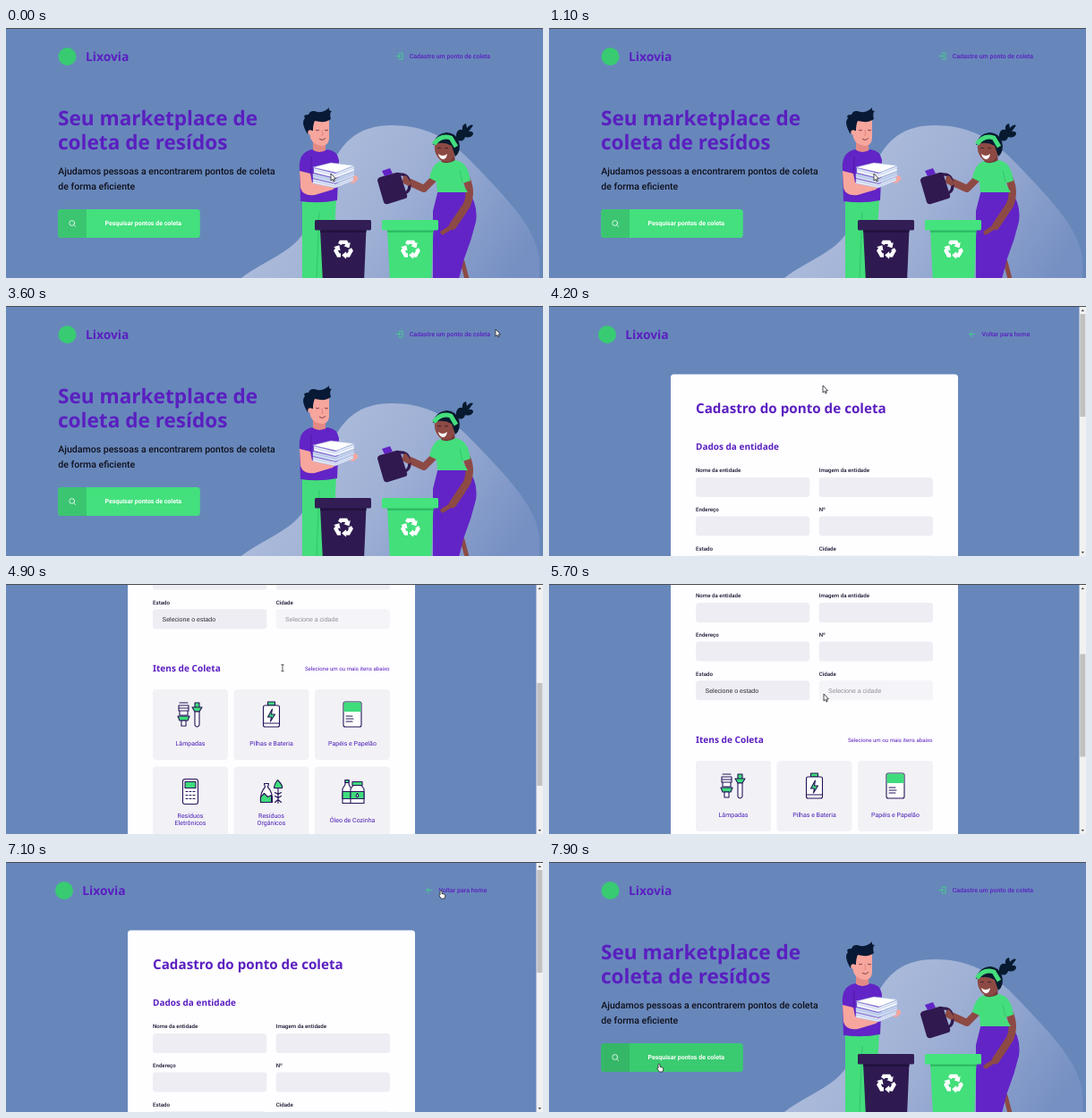
Animation of 600 by 280 pixels, one loop 8 s. Source, as an HTML page:

```html
<!DOCTYPE html>
<html lang="pt">
<head>
<meta charset="utf-8">
<style>
  html, body { margin: 0; width: 100%; height: 100%; overflow: hidden; background: #6787bb; }
  svg { display: block; width: 600px; height: 280px; }
  text { font: 500 7.03px Roboto, sans-serif; fill: #5a1fc0; text-rendering: geometricPrecision; }
  .title { font-family: "Noto Sans", sans-serif; font-weight: 700; }
  .brand { font-size: 13.8px; }
  .hero { font-size: 22.6px; }
  .lead { font-size: 10.55px; fill: #10101c; }
  .label { font-size: 6.15px; fill: #1c1530; }
  .field { font: 7.03px "Liberation Sans", sans-serif; fill: #2b2838; }
  .item { font-weight: 400; fill: #4a1db8; text-anchor: middle; }
  .line { fill: none; stroke: #3fdc80; stroke-width: .8; stroke-linecap: round; stroke-linejoin: round; }
  .icon { fill: #fff; stroke: #251358; stroke-width: 1.1; stroke-linejoin: round; stroke-linecap: round; }
  .icon .g { fill: #3fdc7c; }
  .icon .n { fill: none; }
  .skin { fill: none; stroke: #8d4a45; stroke-linecap: round; stroke-linejoin: round; }
</style>
</head>
<body>
<svg viewBox="0 0 600 280">
  <defs>
    <linearGradient id="haze" x1="0" y1=".35" x2="1" y2=".7">
      <stop offset="0" stop-color="#b3c1de"/>
      <stop offset=".5" stop-color="#9fb0d5"/>
      <stop offset="1" stop-color="#7690c3"/>
    </linearGradient>
    <g id="arrow">
      <path d="M-3.8-5.4L-2.6-7.500H2.600L3.900-5.200" fill="none" stroke="#fff" stroke-width="4"/>
      <path d="M7.200-7.500L6-1.500L.3-3.500Z" fill="#fff"/>
    </g>
    <g id="recycle">
      <use href="#arrow"/><use href="#arrow" transform="rotate(120)"/><use href="#arrow" transform="rotate(240)"/>
    </g>
  </defs>
  <rect width="600" height="280" fill="#6787bb"/>

  <g id="home">
    <path d="M263 280C290 259 321 252 336 224C362 180 358 109 431 109C478 109 503 131 530 160C567 199 597 231 596 266V280Z" fill="url(#haze)"/>
    <circle cx="68.5" cy="32" r="10" fill="#38cb72"/>
    <text class="title brand" x="89" y="37">Lixovia</text>
    <path class="line" d="M439.500 28.500V28H443V35H439.500V34.500M436 31.400H440.500M439 29.900L440.600 31.400L439 32.900"/>
    <text x="450.7" y="33.9">Cadastre um ponto de coleta</text>
    <text class="title hero" x="58" y="108.9">Seu marketplace de</text>
    <text class="title hero" x="58" y="136.2">coleta de resídos</text>
    <text class="lead" x="58.3" y="164">Ajudamos pessoas a encontrarem pontos de coleta</text>
    <text class="lead" x="58.3" y="180.7">de forma eficiente</text>
    <rect id="button" x="58.3" y="203" width="158.5" height="32" rx="3.5" fill="#44e07d"/>
    <path id="side" d="M90 203H62Q58.3 203 58.3 206.500V231.500Q58.3 235 62 235H90Z" fill="#3bc571"/>
    <g class="line" style="stroke:#fff"><circle cx="73.7" cy="218.500" r="2.9"/><path d="M75.900 220.700L77.600 222.400"/></g>
    <text x="153.3" y="221.400" text-anchor="middle" style="font-weight:700;fill:#fff">Pesquisar pontos de coleta</text>

    <!-- man -->
    <path d="M331 192H369L364 285H331Z" fill="#43dd7b"/>
    <path d="M350 206L347 280" stroke="#34c56b" fill="none"/>
    <path d="M343 122H357V138Q350 144 343 138Z" fill="#e48a86"/>
    <path d="M338 101Q351 95 361 101L361 124Q360 132 353 132Q343 131 340 123Z" fill="#f7a69d"/>
    <path d="M337 119Q329 106 334 101Q331 97 338 97Q340 91 348 94Q356 95 361 89Q360 93 364 93Q361 95 363 102Q357 107 345 104Q343 108 343 115L340 115Z" fill="#081935"/>
    <circle cx="340" cy="117" r="2.7" fill="#f7a69d"/>
    <path d="M346 114Q348 116 350 114M356 114Q358 116 360 114M350 124Q354 127 357 123" fill="none" stroke="#5b2434" stroke-width=".8"/>
    <path d="M353 114L354 120L352 120" fill="none" stroke="#dd827f" stroke-width=".8"/>
    <path d="M342 136Q350 142 359 136Q370 137 372 148L370 193Q350 197 329 194L328 160Q326 139 342 136Z" fill="#6224c6"/>
    <path d="M328 160L340 163L342 173L366 174Q371 177 365 181L345 187Q332 189 329 179Z" fill="#f7a69d"/>
    <path d="M341 144Q341 156 340 163" fill="none" stroke="#4a169f" stroke-width=".8"/>
    <path d="M380 172L388 165Q394 165 393 170L388 174Z" fill="#f7a69d"/>
    <g stroke="#a9badd" stroke-width=".5">
      <path d="M343 169L368 175L388 167V171L368 179L343 174Z" fill="#e6ecfa"/>
      <path d="M343 163L368 169L389 161V166L368 174L343 168Z" fill="#cedaf3"/>
      <path d="M344 157L368 163L389 155V160L368 168L344 162Z" fill="#f4f7ff"/>
      <path d="M343 156L363 151L389 154L369 162Z" fill="#fff"/>
      <path d="M344 159L368 165L389 157M343 165L368 171L389 163M343 171L368 177L388 169" fill="none" stroke="#8fa5d6"/>
    </g>

    <!-- woman -->
    <path d="M510 262L516 285" class="skin" stroke-width="5"/>
    <path d="M483 181H515Q528 197 525 217Q520 238 512 258L505 285H477V205Z" fill="#6224c6"/>
    <path class="skin" d="M514 168Q521 184 515 198Q507 210 499 222" stroke-width="8.500"/>
    <path class="skin" d="M499 222L488 229" stroke-width="5"/>
    <path d="M487 140H501L502 154H486Z" fill="#743c3a"/>
    <path d="M479 130Q490 119 502 128Q505 142 496 149Q487 152 482 144Q478 138 479 130Z" fill="#8d4a45"/>
    <path d="M477 131Q480 118 493 117Q503 118 506 127Q509 138 502 144L498 132Q488 126 477 131Z" fill="#081a2f"/>
    <path d="M503 125Q502 112 510 114Q509 108 514 107L515 112Q519 107 522 109Q519 113 517 116Q522 115 522 119Q519 124 513 122Q511 129 503 125Z" fill="#081a2f"/>
    <path d="M478 130Q486 119 497 123L503 133" fill="none" stroke="#45de7d" stroke-width="5"/>
    <path d="M482 135Q484 133 486 135M490 135Q492 133 494 135" fill="none" stroke="#271a20" stroke-width=".8"/>
    <path d="M483 141Q488 145 493 141Q492 147 488 147Q484 146 483 141Z" fill="#fff"/>
    <path class="skin" d="M447 171L467 180L477 170" stroke-width="8"/>
    <path d="M485 149Q493 154 502 148Q513 149 517 162L519 171L510 174L516 184H482L481 172L473 168Q476 153 485 149Z" fill="#45de7d"/>
    <path d="M507 160L510 173" fill="none" stroke="#32bd68" stroke-width=".8"/>
    <path d="M418 167L436 162Q440 161 441 165L448 187Q449 190 446 191L427 197Q423 198 422 195L415 171Q415 168 418 167Z" fill="#30194f"/>
    <path d="M438 164Q449 163 450 171Q453 182 446 185" fill="none" stroke="#30194f" stroke-width="3.2"/>
    <path d="M420 160L429 157L432 163L423 166Z" fill="#6224c6"/>
    <path class="skin" d="M446 168L450 174" stroke-width="5"/>

    <g id="bins"></g>
  </g>

  <g id="form">
    <g id="page">
      <circle cx="65" cy="32" r="10" fill="#38cb72"/>
      <text class="title brand" x="85.3" y="37">Lixovia</text>
      <path class="line" d="M476 31.500H470M472.700 28.700L469.900 31.500L472.700 34.300"/>
      <text x="483.500" y="34">Voltar para home</text>
      <rect x="136" y="76.500" width="321" height="530" rx="3.5" fill="#fefdff"/>
      <text class="title" x="164" y="119.500" style="font-size:15.2px">Cadastro do ponto de coleta</text>
      <text class="title" x="164" y="161" style="font-size:10px">Dados da entidade</text>
      <g id="fields"></g>
      <text class="field" x="174.500" y="292.500">Selecione o estado</text>
      <text class="field" x="312" y="292.500" opacity=".5">Selecione a cidade</text>
      <text class="title" x="164" y="349" style="font-size:10.1px">Itens de Coleta</text>
      <text x="428.500" y="347.700" text-anchor="end" style="font-size:6.15px;font-weight:400">Selecione um ou mais itens abaixo</text>
      <g id="items"></g>
    </g>
    <rect x="592.500" width="7.500" height="280" fill="#f1f1f1"/>
    <rect id="thumb" x="593.300" y="9" width="6" height="115" fill="#c1c1c1"/>
    <path d="M594.500 6L596.300 3.700L598.100 6ZM594.500 275L596.300 277.300L598.100 275Z" fill="#555"/>
  </g>

  <rect width="600" height="1" fill="#4b4d52"/>

  <g id="cursor" stroke-width=".8" stroke-linejoin="round">
    <path id="pointer" d="M0 0V8L1.800 6.400L3 9L4.200 8.500L3.100 5.900H5.500Z" fill="#fff" stroke="#222"/>
    <path id="hand" d="M1 0Q2 0 2 1V3.500L5 4.200Q6 4.500 5.800 6L5 9H1.500L-1.300 5.500Q-1.300 4.400 0 5V1Q0 0 1 0Z" fill="#fff" stroke="#222"/>
    <path id="beam" d="M-1.500-3.500H1.500M0-3.500V3.500M-1.500 3.500H1.500" fill="none" stroke="#333"/>
  </g>
</svg>
<script>
const $ = id => document.getElementById(id);
const show = (id, on) => $(id).setAttribute('display', on ? 'inline' : 'none');

const bin = (x, lid, body, shade) => `<g transform="translate(${x} 215)">
  <path d="M6 10H57.500L55 70H9Z" fill="${body}"/><path d="M6 11H57.500V14H6Z" fill="${shade}"/>
  <rect width="63" height="11.500" rx="1.500" fill="${lid}"/>
  <use href="#recycle" transform="translate(32 33) scale(1.08)"/></g>`;
$('bins').innerHTML = bin(345, '#321d55', '#2e1a50', '#21123d') + bin(420, '#45e37e', '#42df7b', '#2fbb64');

const labels = ['Nome da entidade', 'Imagem da entidade', 'Endereço', 'Nº', 'Estado', 'Cidade'];
$('fields').innerHTML = labels.map((label, i) => {
  const x = i % 2 ? 301.7 : 164, y = 184 + (i >> 1) * 43.6;
  return `<text class="label" x="${x}" y="${y + 2.4}">${label}</text>
    <rect x="${x}" y="${y + 8}" width="127.300" height="22" rx="3.500" fill="${i == 5 ? '#f5f4f8' : '#eeedf3'}"/>`;
}).join('');

const items = [
  ['Lâmpadas', `<path d="M-12-13H-3M-13-10H-2V-7H-13ZM-13-7H-2V-4H-13ZM-12-4H-3V1H-12Z"/>
    <path class="g" d="M-14 2H-1L-3 7H-12Z"/><path d="M-10 7H-5V13H-10Z"/>
    <path class="g" d="M2-8H13L10-3H5ZM5-13H10V-8H5Z"/><path d="M5-3H10V12Q7.500 16 5 12Z"/>`],
  ['Pilhas e Bateria', `<path class="g" d="M-4-14H4V-10H-4Z"/><rect x="-9" y="-10" width="18" height="24" rx="2"/>
    <path class="n" d="M-9 10H9"/><path class="g" d="M1-6L-4 3H0L-1 8L4 0H0Z"/>`],
  ['Papéis e Papelão', `<rect x="-10" y="-14" width="20" height="28" rx="2"/>
    <path class="g" d="M-9.500-13.500H9.500V-3H-9.500Z" stroke="none"/><path class="n" d="M-7 2H0M-7 5H1M-7 8H0"/>`],
  ['Resíduos|Eletrônicos', `<rect x="-8.500" y="-14" width="17" height="28" rx="2.500"/>
    <path class="g" d="M-6-11H6V-4H-6Z"/><path class="n" d="M-5 0H-3M-1 0H1M3 0H5M-5 4H-3M-1 4H1M3 4H5M-5 8H-3M-1 8H1M3 8H5"/>`],
  ['Resíduos|Orgânicos', `<path d="M-8-9H-3L-4-5Q2 1 1 12H-12Q-13 1-7-5Z"/><path d="M-12 6L-8 2L-4 6L0 4V12H-12Z" class="g"/>
    <path class="g" d="M7-13Q13-7 12-4H3Q3-8 7-13Z"/><path class="n" d="M7.500-4V13M4 1L7.500 3L11 1M4 5L7.500 7L11 5M4 12L7.500 9L11 12"/>`],
  ['Óleo de Cozinha', `<path d="M-8-13H-4V-8L-1-3V13H-11V-3L-8-8Z"/><path class="g" d="M-11 0H-1V8H-11ZM-8-13H-4V-10H-8Z"/>
    <path class="g" d="M0-11H11V-7H0Z"/><path d="M1-7H10L13-3V13H-2V-3Z"/><path class="g" d="M-2 0H13V8H-2Z"/>
    <path d="M5.500 2Q8 6 5.500 6Q3 6 5.500 2Z"/>`]
];
$('items').innerHTML = items.map(([name, icon], i) => {
  const lines = name.split('|'), top = lines.length > 1 ? 57.6 : 62.5;
  return `<g transform="translate(${206 + i % 3 * 90.5} ${369 + (i > 2) * 86.5})">
    <rect x="-42" width="84" height="79" rx="4" fill="#f2f1f5"/>
    <g class="icon" transform="translate(0 28)">${icon}</g>
    ${lines.map((s, k) => `<text class="item" y="${top + k * 8}">${s}</text>`).join('')}</g>`;
}).join('');

// Each key: time, then values; eased between neighbours.
const path = [[0, 363, 163], [1900, 363, 163], [2250, 560, 13], [2400, 547, 26], [3600, 547, 26],
  [3800, 500, 31], [3900, 500, 31], [4200, 306, 89], [4600, 309, 94], [5400, 309, 94],
  [5700, 307, 123], [6300, 307, 123], [6900, 485, 32], [7200, 485, 32], [7800, 122, 226], [8000, 122, 226]];
const scroll = [[0, 0], [4500, 0], [4900, 251], [5400, 251], [5700, 171], [6200, 0], [8000, 0]];

function at(keys, t) {
  const i = keys.findIndex(k => k[0] > t), a = keys[i - 1], b = keys[i];
  const p = (t - a[0]) / (b[0] - a[0]), e = p * p * (3 - 2 * p);
  return a.slice(1).map((v, k) => v + (b[k + 1] - v) * e);
}
const within = (x, y, l, t, r, b) => x >= l && x <= r && y >= t && y <= b;

function draw(now) {
  const t = Math.floor(now % 8000 / 100) * 100;
  const form = t >= 3900 && t < 7300;
  const [x, y] = at(path, t), [s] = at(scroll, t);
  show('home', !form);
  show('form', form);
  $('page').setAttribute('transform', `translate(0 ${-s})`);
  $('thumb').setAttribute('y', 9 + s * .406);

  const onButton = !form && within(x, y, 58, 203, 217, 235);
  const onLink = form ? s < 1 && within(x, y, 468, 24, 538, 38) : within(x, y, 435, 24, 541, 38);
  const beam = form && s > 200;
  $('button').setAttribute('fill', onButton ? '#3acb70' : '#44e07d');
  $('side').setAttribute('fill', onButton ? '#35b767' : '#3bc571');
  show('hand', onButton || onLink);
  show('beam', beam);
  show('pointer', !onButton && !onLink && !beam);
  $('cursor').setAttribute('transform', `translate(${x} ${y})`);
}
const start = performance.now();
function tick() {
  draw(performance.now() - start);
  requestAnimationFrame(tick);
}
tick();
</script>
</body>
</html>
```
